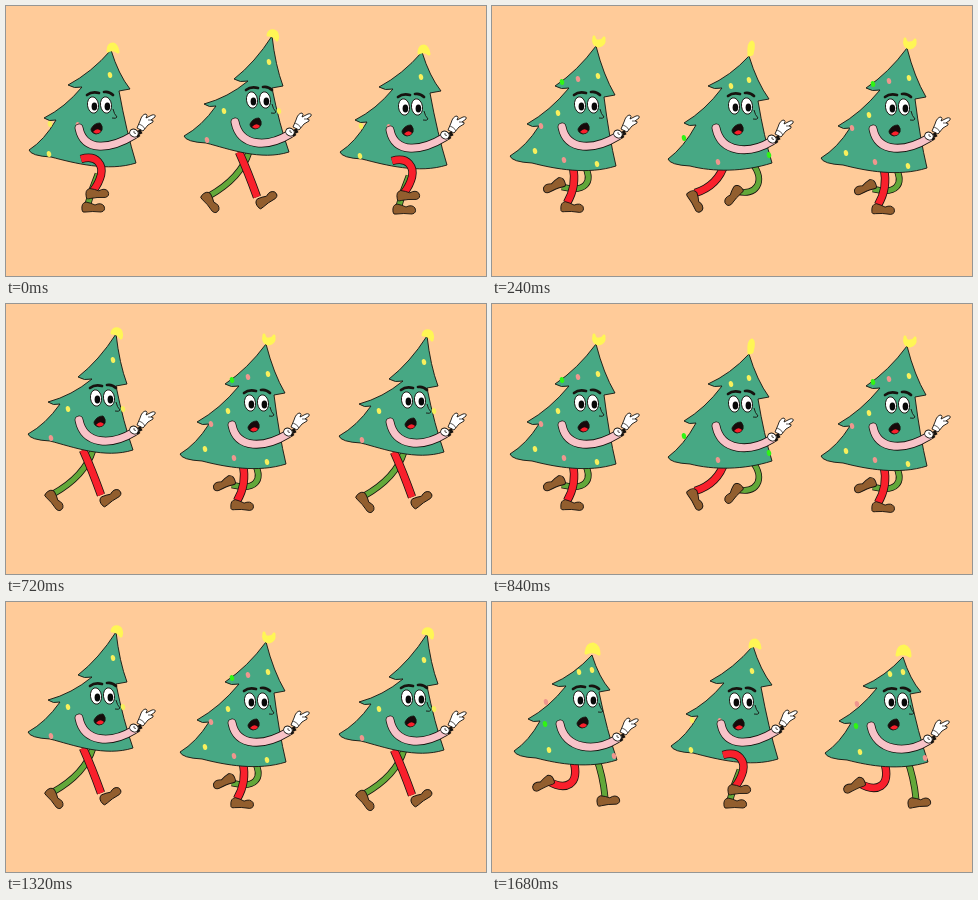
An HTML page that plays this animation: 480x270 px, repeating every 1800 ms.

```html
<!DOCTYPE html>
<html lang="en">
<head>
<meta charset="utf-8">
<title>Walking trees</title>
<style>
  html, body { margin: 0; width: 100%; height: 100%; overflow: hidden; background: #ffcb99; }
  svg { display: block; width: 100vw; height: 100vh; }
</style>
</head>
<body>
<svg id="stage" viewBox="0 0 480 270" xmlns="http://www.w3.org/2000/svg"></svg>
<script>
const INK = '#17130f', GREEN = '#47a884', YELLOW = '#fff655', PINK = '#f8c3c8',
      RED = '#f9202c', LEAF = '#62a83a', SHOE = '#925e2e';
const BULBS = { y: '#f8f05c', p: '#f0968e', g: '#30f514' };
const STEP = 120;

const path = (d, fill = 'none', stroke = INK, w = 0.9, extra = '') =>
  `<path d="${d}" fill="${fill}" stroke="${stroke}" stroke-width="${w}" stroke-linejoin="round" ${extra}/>`;
const oval = (x, y, rx, ry, fill, stroke = 'none', turn = 0) =>
  `<ellipse cx="${x}" cy="${y}" rx="${rx}" ry="${ry}" fill="${fill}" stroke="${stroke}" stroke-width=".9" transform="rotate(${turn} ${x} ${y})"/>`;
const tube = (d, color, w, cap = 'butt') =>
  [[INK, w + 1.6], [color, w]].map(([c, n]) => path(d, 'none', c, n, `stroke-linecap="${cap}"`)).join('');
const at = (x, y, turn, body) => `<g transform="translate(${x} ${y}) rotate(${turn})">${body}</g>`;

// Tips run apex, left side down, then right side from the bottom up.
function tree([a, l1, l2, l3, r2, r1]) {
  const side = (p, q, bend) =>
    `Q${(p[0] + q[0]) / 2 + bend} ${(p[1] + q[1]) / 2 + 5} ${q[0]} ${q[1]}`;
  const notch = (p, dx) => [p[0] + dx, p[1] + 2];
  const n1 = notch(l1, 14), n2 = notch(l2, 12), m1 = notch(r1, -11);
  const d = `M${a}${side(a, l1, 2)}Q${l1[0] + 6} ${l1[1] + 4} ${n1}` +
    `${side(n1, l2, 2)}Q${l2[0] + 5} ${l2[1] + 4} ${n2}${side(n2, l3, 2)}` +
    `Q${l3[0] + 2} ${l3[1] + 6} ${l3[0] + 22} ${l3[1] + 7}` +
    `C${l3[0] + 45} ${l3[1] + 13} ${r2[0] - 28} ${r2[1] + 9} ${r2}` +
    `${side(r2, m1, -1)}L${r1}${side(r1, a, -2)}Z`;
  return path(d, GREEN);
}

function shoe([x, y, turn, flip = 1]) {
  const d = 'M-11 3Q-12-4-7-5Q-2-4 2-2Q8-5 11-1Q13 4 8 5Q-1 4-7 5Q-11 6-11 3Z';
  return at(x, y, turn, `<g transform="scale(${flip} 1)">${path(d, SHOE)}</g>`);
}

const leg = (l, color, w) => tube(l.d, color, w) + shoe(l.foot);

function face([x, y]) {
  const eye = dx => oval(dx, 0, 5.5, 8.2, '#fff', INK, -8) +
    oval(dx + 1.4, 1.6, 2.8, 4, '#080808');
  return at(x, y, 0,
    eye(0) + eye(13) +
    path('M-6-10Q-1-14 6-12M11-13Q16-14 20-10', 'none', INK, 2.7, 'stroke-linecap="round"') +
    path('M20 4Q21 9 24 12Q23 14 19 13') +
    path('M-2 24Q1 18 7 18Q10 21 9 25Q7 29 3 29Q-2 28-2 24Z', '#160b0b') +
    path('M0 27Q4 22 8 26Q6 29 3 28.5Z', RED, 'none'));
}

function arm([sx, sy], [hx, hy]) {
  const d = `M${sx} ${sy}C${sx + 5} ${sy + 25} ${hx - 28} ${hy + 19} ${hx - 5} ${hy + 5}`;
  const hand = path('M-2-2L1-9Q3-16 7-16Q9-15 7-12L13-15Q17-16 16-13L12-10Q15-10 14-8L9-5L4 1Z', '#fff') +
    path('M0-6Q4-5 6-1M9-10L12-10', 'none', INK, .7);
  const watch = path('M-5 0L0 7M0 0L2 4', 'none', INK, 3.4) + oval(-5, 3, 4.4, 3.8, '#fff', INK, 25) +
    path('M-5 3L-5 1M-5 3L-3 3.5', 'none', INK, .7);
  return tube(d, PINK, 7.2, 'round') + at(hx, hy, 0, hand + watch);
}

function figure(p) {
  const back = leg(p.back, LEAF, 5.2), front = leg(p.front, RED, 6.8);
  const bulbs = p.bulbs.split(' ').map(b => {
    const [c, x, y] = b.split(',');
    return oval(x, y, 2.2, 3, BULBS[c], 'none', -12);
  }).join('');
  return back + (p.over ? '' : front) + tree(p.tips) + (p.over ? front : '') + bulbs +
    path(p.star, YELLOW, YELLOW, 3, 'stroke-linecap="round"') + face(p.face) + arm(p.shoulder, p.hand);
}

const squat = {
  tips: [[105, 44], [62, 79], [38, 112], [23, 144], [130, 157], [124, 83]],
  star: 'M102 45Q102 38 107 38Q111 39 112 46Q107 42 102 45Z',
  bulbs: 'y,104,69 y,44,118 p,72,119 y,43,148',
  face: [87, 99], shoulder: [73, 122], hand: [133, 124], over: true,
  back: { d: 'M92 168Q86 182 82 198', foot: [87, 201, 0] },
  front: { d: 'M75 153C92 148 97 160 95 169Q93 177 87 185', foot: [91, 187, -4] }
};
const stride = {
  tips: [[110, 30], [72, 73], [42, 98], [22, 130], [127, 146], [121, 80]],
  star: 'M106 29Q107 24 112 25Q117 27 115 34Q112 29 106 29Z',
  bulbs: 'y,107,56 y,62,105 p,45,134 y,117,105',
  face: [90, 94], shoulder: [73, 116], hand: [133, 123],
  back: { d: 'M87 146Q79 172 47 190', foot: [49, 196, 50] },
  front: { d: 'M77 146Q86 166 95 191', foot: [104, 193, -35] }
};
const plant = {
  tips: [[104, 40], [63, 80], [35, 118], [18, 150], [124, 160], [123, 89]],
  star: 'M102 31Q103 36 107 35Q111 35 112 32Q113 39 107 40Q100 39 102 31Z',
  bulbs: 'g,70,76 p,86,73 y,106,70 y,66,107 p,49,120 y,43,145 p,72,154 y,105,158',
  face: [88, 99], shoulder: [70, 121], hand: [131, 125],
  back: { d: 'M93 160C101 176 94 187 70 181', foot: [62, 179, -22, -1] },
  front: { d: 'M81 161Q85 180 75 197', foot: [80, 201, 3] }
};
const push = {
  tips: [[101, 50], [60, 80], [36, 117], [20, 153], [124, 157], [121, 93]],
  star: 'M101 49Q100 37 104 36Q107 38 104 48Z',
  bulbs: 'g,36,132 p,70,156 y,83,80 y,101,74 g,121,149',
  face: [86, 100], shoulder: [68, 122], hand: [129, 130],
  back: { d: 'M104 157C119 176 107 191 89 185', foot: [85, 189, -48, -1] },
  front: { d: 'M77 157Q70 180 47 187', foot: [48, 195, 60] }
};
const kick = {
  tips: [[100, 53], [60, 82], [36, 117], [22, 149], [125, 158], [118, 88]],
  star: 'M94 51Q95 42 101 42Q107 44 107 52Q101 48 94 51Z',
  bulbs: 'y,87,70 y,100,68 p,54,100 g,53,122 y,57,148 p,122,154',
  face: [87, 97], shoulder: [68, 122], hand: [130, 132],
  back: { d: 'M104 155Q111 174 113 195', foot: [116, 198, -6] },
  front: { d: 'M81 157C89 184 73 189 56 179', foot: [51, 181, -25, -1] }
};

const poses = [squat, stride, plant, push, kick];
const walkers = [[0, 0, 0], [156, 0, 1], [311, 2, 0]];  // x, y, lead in steps

const stage = document.getElementById('stage');
stage.innerHTML = '<rect width="480" height="270" fill="#ffcb99"/><defs>' +
  poses.map((p, i) => `<g id="pose${i}">${figure(p)}</g>`).join('') + '</defs>' +
  walkers.map(([x, y]) => `<use class="walker" x="${x}" y="${y}"/>`).join('');
const uses = [...stage.querySelectorAll('.walker')];

function draw(ms) {
  const step = Math.floor(ms / STEP);
  uses.forEach((u, i) => u.setAttribute('href', '#pose' + (step + walkers[i][2]) % poses.length));
}

const start = performance.now();
function tick() {
  draw(performance.now() - start);
  requestAnimationFrame(tick);
}
tick();
</script>
</body>
</html>
```
